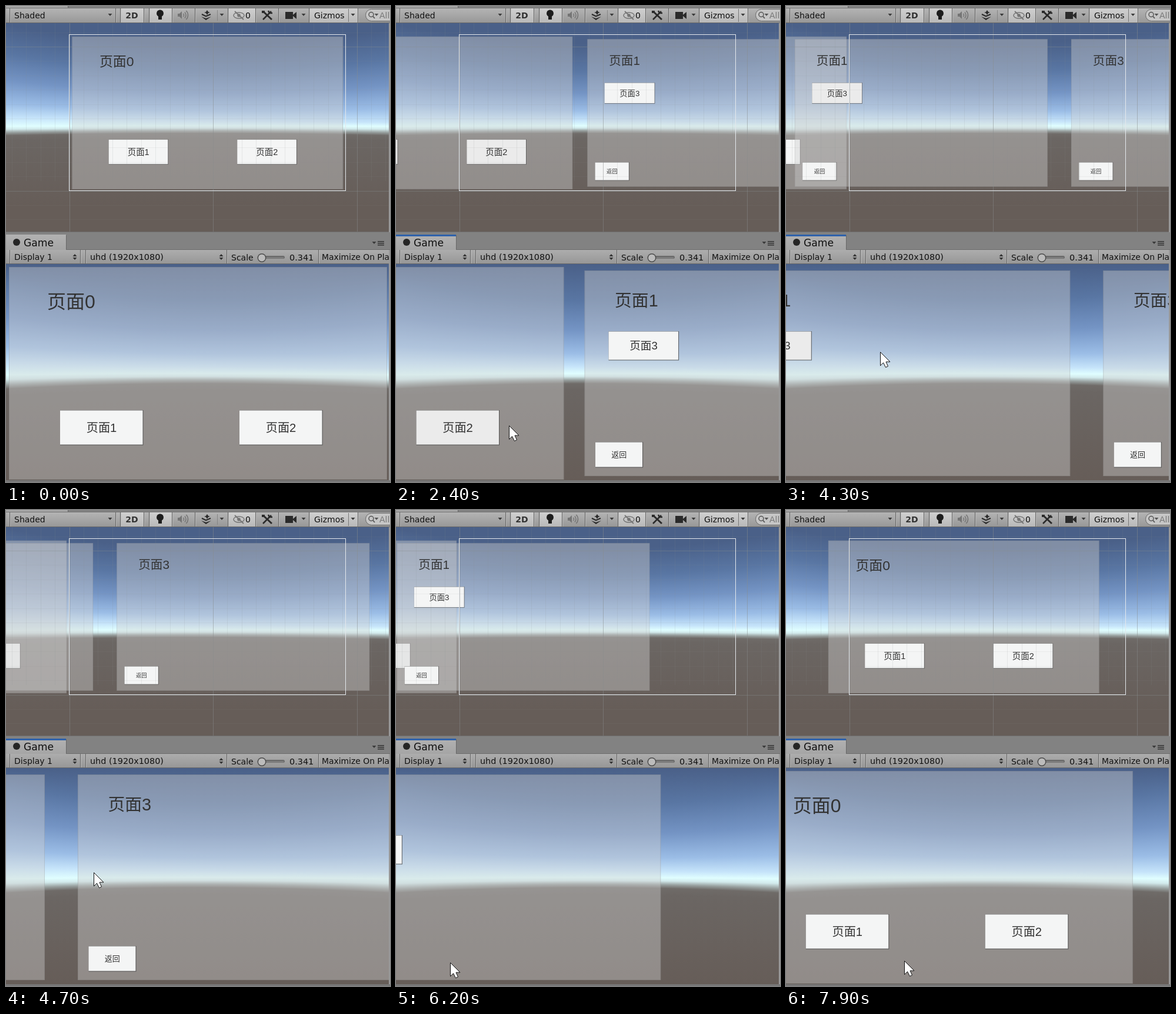
Animation of 653x808 px, one loop 8 s. Source, as an HTML page with a canvas:

```html
<!DOCTYPE html>
<html lang="zh">
<head>
<meta charset="utf-8">
<style>
html, body { margin: 0; width: 100%; height: 100%; overflow: hidden; background: #828282; }
canvas { display: block; }
</style>
</head>
<body>
<canvas id="stage" width="653" height="808"></canvas>
<script>
const W = 653, H = 808, LOOP = 8000, STEP = 100, PAGE = 656;
const stage = document.getElementById('stage').getContext('2d');
const UI = '"DejaVu Sans", sans-serif';
const LABEL = '"Liberation Sans", "Noto Sans CJK SC", "Noto Sans CJK", sans-serif';
const INK = '#323232';

function rect(c, x, y, w, h, color) {
  c.fillStyle = color;
  c.fillRect(x, y, w, h);
}

function text(c, str, x, y, size, color = '#111', family = UI, align = 'left', weight = '') {
  c.font = `${weight} ${size}px ${family}`;
  c.textAlign = align;
  c.fillStyle = color;
  c.fillText(str, x, y);
}

function shape(c, points, color) {
  c.beginPath();
  points.forEach(([x, y]) => c.lineTo(x, y));
  c.closePath();
  c.fillStyle = color;
  c.fill();
}

function stroke(c, points, color, width = 1) {
  c.beginPath();
  points.forEach(([x, y], i) => i ? c.lineTo(x, y) : c.moveTo(x, y));
  c.strokeStyle = color;
  c.lineWidth = width;
  c.stroke();
}

function disc(c, x, y, r, color) {
  c.beginPath();
  c.arc(x, y, r, 0, 7);
  c.fillStyle = color;
  c.fill();
}

function shade(c, x, y, w, h, from, to) {
  const g = c.createLinearGradient(0, y, 0, y + h);
  g.addColorStop(0, from);
  g.addColorStop(1, to);
  rect(c, x, y, w, h, g);
}

// Height above the horizon, colour, and how far the band bends towards the sides
const SKY = [
  [-200, '#4a6088', -28], [-138, '#5976a3', -25], [-88, '#7494c4', -18],
  [-48, '#9bbde6', -8], [-26, '#c6e4fa', -1], [-14, '#e0feff', 2],
  [-9, '#d2eaec', 5], [-3, '#979f9e', 8], [3, '#6f6b68', 9], [14, '#6b6663', 9], [166, '#665d58', 9]
];

function drawSky(c, top, bottom, horizon, scale, bend) {
  for (let x = 0; x < 651; x += 3) {
    const u = x / 325.5 - 1;
    const g = c.createLinearGradient(0, top, 0, bottom);
    for (const [dy, color, curve] of SKY) {
      const side = (curve > 0 ? curve * bend : curve) * u * u + (dy < -20 ? 4 * u : 0);
      const at = (horizon + dy * scale + side - top) / (bottom - top);
      g.addColorStop(Math.min(1, Math.max(0, at)), color);
    }
    rect(c, x, top, Math.min(3, 651 - x), bottom - top, g);
  }
}

const down = (c, x, y, color = '#3a3a3a') => shape(c, [[x - 3.5, y - 2], [x + 3.5, y - 2], [x, y + 2]], color);

function upDown(c, x, y) {
  shape(c, [[x - 3.5, y - 1], [x + 3.5, y - 1], [x, y - 5]], '#333');
  shape(c, [[x - 3.5, y + 1], [x + 3.5, y + 1], [x, y + 5]], '#333');
}

function separators(c, xs, y, h) {
  for (const x of xs) {
    rect(c, x, y, 1, h, '#636363');
    rect(c, x + 1, y, 1, h, '#b9b9b9');
  }
}

function drawTopBar(c) {
  rect(c, 0, 0, W, 4, '#828282');
  rect(c, 0, 0, 105, 3, '#a7a7a7');
  rect(c, 105, 0, 1, 3, '#666');
  rect(c, 0, 3, W, 1, '#707070');
  shade(c, 0, 4, W, 24, '#b4b4b4', '#989898');
  rect(c, 0, 28, W, 1, '#6a6a6a');
  for (const [x, w] of [[195, 40], [244, 38], [378, 46], [516, 82]]) shade(c, x, 4, w, 24, '#d0d0d0', '#b9b9b9');
  separators(c, [6, 186, 194, 234, 243, 282, 321, 377, 424, 463, 515, 598], 4, 24);

  text(c, 'Shaded', 14, 21, 14);
  down(c, 177, 15);
  text(c, '2D', 214, 21, 14, '#333', UI, 'center', 'bold');

  disc(c, 262, 12.5, 6, '#1d1d1d');
  rect(c, 259, 17, 6, 6, '#1d1d1d');

  shape(c, [[292, 13], [295, 13], [299, 9], [299, 22], [295, 18], [292, 18]], '#747474');
  c.strokeStyle = '#747474';
  c.lineWidth = 1.5;
  for (const r of [3.5, 7, 10.5]) {
    c.beginPath();
    c.arc(299, 15.5, r, -.8, .8);
    c.stroke();
  }

  stroke(c, [[333, 14], [340, 17.5], [348, 14]], '#2a2a2a', 2);
  shape(c, [[332, 18], [340, 21], [349, 18], [340, 24]], '#2a2a2a');
  shape(c, [[342, 7], [344, 10], [347, 11], [344, 12], [342, 15], [340, 12], [337, 11], [340, 10]], '#2a2a2a');
  rect(c, 359, 7, 1, 18, '#858585');
  down(c, 367, 15);

  c.beginPath();
  c.ellipse(396, 16, 9, 5, 0, 0, 7);
  c.strokeStyle = '#747474';
  c.lineWidth = 1.5;
  c.stroke();
  disc(c, 396, 16, 2.8, '#747474');
  stroke(c, [[389, 9], [404, 23]], '#747474', 1.8);
  text(c, '0', 407, 21, 14);

  stroke(c, [[437, 9], [452, 23]], '#2a2a2a', 3);
  stroke(c, [[451, 9], [437, 23]], '#2a2a2a', 2.5);
  stroke(c, [[446, 8], [448, 12], [453, 12]], '#2a2a2a', 2.5);
  rect(c, 435, 8, 5, 4, '#2a2a2a');

  rect(c, 475, 10, 13, 12, '#2a2a2a');
  shape(c, [[488, 15], [494, 10], [494, 22], [488, 17]], '#2a2a2a');
  down(c, 506, 15);
  text(c, 'Gizmos', 524, 21, 14);
  rect(c, 582, 5, 1, 22, '#777');
  down(c, 590, 15);

  c.beginPath();
  c.roundRect(611.5, 5.5, 60, 20, 10);
  c.fillStyle = '#c6c6c6';
  c.fill();
  c.strokeStyle = '#686868';
  c.lineWidth = 1;
  c.stroke();
  c.beginPath();
  c.arc(621, 14.5, 4, 0, 7);
  c.strokeStyle = '#555';
  c.lineWidth = 1.5;
  c.stroke();
  stroke(c, [[624, 17.5], [627, 21]], '#555', 1.8);
  down(c, 630, 15, '#555');
  text(c, 'All', 635, 21, 14, '#777');
}

function drawGameBar(c) {
  rect(c, 0, 383, W, 1, '#707070');
  rect(c, 0, 384, W, 29, '#828282');
  shade(c, 0, 388, 102, 26, '#b2b2b2', '#a5a5a5');
  rect(c, 102, 389, 1, 24, '#686868');
  rect(c, 102, 413, W - 102, 1, '#6c6c6c');
  disc(c, 18, 401, 6, '#252525');
  text(c, 'Game', 30, 408, 17.2);
  down(c, 626, 402);
  for (const y of [399, 402, 405]) rect(c, 632, y, 11, 1.5, '#333');

  shade(c, 0, 414, W, 23, '#adadad', '#979797');
  rect(c, 0, 437, W, 1, '#6a6a6a');
  separators(c, [6, 126, 135, 375, 531], 414, 23);
  text(c, 'Display 1', 14, 431, 14);
  upDown(c, 117, 426);
  text(c, 'uhd (1920x1080)', 143, 431, 14.4);
  upDown(c, 366, 426);
  text(c, 'Scale', 383, 432, 14);
  c.beginPath();
  c.roundRect(438, 424, 36, 5, 2.5);
  c.fillStyle = '#6d6d6d';
  c.fill();
  rect(c, 440, 427, 32, 1, '#909090');
  disc(c, 435, 427.5, 7.5, '#4c4c4c');
  disc(c, 435, 427.5, 6, '#bcbcbc');
  text(c, '0.341', 482, 432, 14.4);
  text(c, 'Maximize On Pla', 537, 431, 13.9);
}

const backdrop = Object.assign(document.createElement('canvas'), { width: W, height: H });

function drawBackdrop() {
  const c = backdrop.getContext('2d');
  rect(c, 0, 0, W, H, '#828282');
  drawSky(c, 29, 383, 214, .75, .4);
  drawSky(c, 438, 805, 638, 1, 1);
  drawTopBar(c);
  drawGameBar(c);
  rect(c, 651, 29, 2, 355, '#9a9a9a');
  rect(c, 651, 414, 2, 394, '#9a9a9a');
  rect(c, 0, 805, W, 3, '#777');
}

function drawGrid(c) {
  for (let i = -4; i <= 22; i++) {
    const major = i % 10 === 0;
    rect(c, Math.round(107.5 + i * 24.45), 29, 1, major ? 354 : 268, `rgba(135,140,140,${major ? .5 : .14})`);
  }
  for (let i = -2; i <= 11; i++) {
    const major = i % 10 === 0;
    rect(c, 0, Math.round(313.5 - i * 24.45), 651, 1, `rgba(135,140,140,${major ? .42 : .1})`);
  }
  c.strokeStyle = '#e4e8ec';
  c.lineWidth = 1;
  c.strokeRect(107.5, 48.5, 470, 265);
}

// Button: x, y, width, height, label, text size, times of [press, release, deselect]
const back = times => [45.5, 740, 80.5, 43, '返回', 13, times];
const PAGES = [
  { box: [5, 443, 643, 361], title: ['页面0', 70, 512.5, 32], buttons: [
    [92, 686, 141, 59, '页面1', 20.2, [1400, 1600, 4000]],
    [397, 686, 141, 59, '页面2', 20.2]] },
  { box: [27, 449, 600, 349], title: ['页面1', 78.5, 510, 28.8], buttons: [
    [68, 552, 119, 49, '页面3', 18.6, [4000, 4100, 5400]],
    back([6600, 6700, 6700])] },
  { box: [27, 449, 600, 349], title: ['页面3', 78.5, 510, 28.8], buttons: [back([5400, 5600, 5600])] }
];

const MOVES = [
  { start: 1873, time: 1000, lead: 15 },
  { start: 3969, time: 1000, lead: 16 },
  { start: 5567, time: 1000, lead: 0 },
  { start: 7158, time: 940, lead: 3 }
];

function progress(t, i, scene) {
  const { start, time, lead } = MOVES[i];
  const u = Math.min(1, Math.max(0, (t - start + (scene ? lead : 0)) / time));
  const p = u < .5 ? 2 * u * u : 1 - 2 * (1 - u) ** 2;
  return p < .006 ? 0 : p;
}

// Page offsets in screen pixels; null while a page is hidden
function offsets(t, scene) {
  const [a, b, c, d] = MOVES.map((_, i) => progress(t, i, scene));
  return [
    (d - a) * PAGE,
    t >= 1600 && t < 6700 ? (1 - a - b + c) * PAGE : null,
    t >= 4100 && t < 5600 ? (1 - b) * PAGE : null
  ];
}

const CURSOR = [
  [300, 584, 177], [600, 436, 430], [700, 436, 430], [1300, 190, 708], [1400, 192, 712],
  [2800, 192, 712], [3500, 160, 587], [4500, 160, 587], [5300, 92, 768],
  [6800, 92, 768], [7200, 202, 760], [7400, 202, 760], [7900, 201, 765]
];

function cursorAt(t) {
  if (t < CURSOR[0][0]) return null;
  const i = CURSOR.findIndex(k => k[0] > t);
  if (i < 0) return CURSOR.at(-1).slice(1);
  const [t0, x0, y0] = CURSOR[i - 1], [t1, x1, y1] = CURSOR[i];
  const u = (t - t0) / (t1 - t0), e = u * u * (3 - 2 * u);
  return [x0 + (x1 - x0) * e, y0 + (y1 - y0) * e];
}

function hovered(t, page, [x, y, w, h]) {
  const p = cursorAt(t), dx = offsets(t, false)[page];
  if (!p || dx === null) return false;
  const px = p[0] - dx - x, py = p[1] - y;
  return px >= 0 && px <= w && py >= 0 && py <= h;
}

function buttonColor(t, page, button) {
  const [press, release, deselect] = button[6] || [LOOP, LOOP, LOOP];
  if (t >= press && t < release) return '#d7d7d7';
  const active = t >= release && t < deselect;
  return active || hovered(t, page, button) || hovered(t - STEP, page, button) ? '#ebebeb' : '#f4f5f5';
}

function drawPage(c, t, index, dx) {
  const { box: [x, y, w, h], title: [name, tx, ty, size], buttons } = PAGES[index];
  c.save();
  c.translate(dx, 0);
  rect(c, x, y, w, h, 'rgba(207,207,207,.41)');
  c.strokeStyle = 'rgba(90,90,90,.18)';
  c.lineWidth = 1;
  c.strokeRect(x + .5, y + .5, w - 1, h - 1);
  text(c, name, tx, ty, size, INK, LABEL);
  for (const b of buttons) {
    const [bx, by, bw, bh, label, fs] = b;
    rect(c, bx, by, bw + .6, bh + .6, 'rgba(70,70,70,.75)');
    rect(c, bx, by + .5, bw - .5, bh - 1, buttonColor(t, index, b));
    text(c, label, bx + bw / 2, by + bh / 2 + fs * .37, fs, INK, LABEL, 'center');
  }
  c.restore();
}

function drawView(c, t, top, bottom, scene) {
  c.save();
  c.beginPath();
  c.rect(0, top, 651, bottom - top);
  c.clip();
  c.save();
  if (scene) {
    c.translate(108, 49);
    c.scale(.7166, .718);
    c.translate(1, -439);
  }
  offsets(t, scene).forEach((dx, i) => dx !== null && drawPage(c, t, i, dx));
  c.restore();
  if (scene) drawGrid(c);
  c.restore();
}

function drawCursor(c, [x, y]) {
  c.save();
  c.translate(Math.round(x) + .5, Math.round(y) + .5);
  const arrow = [[0, 0], [0, 23], [5, 18], [9, 26], [13, 24], [9.5, 16.5], [16.5, 16.5]];
  shape(c, arrow, '#fff');
  c.strokeStyle = '#111';
  c.lineWidth = 1;
  c.stroke();
  c.restore();
}

function draw(t) {
  stage.drawImage(backdrop, 0, 0);
  if (t >= 1400) rect(stage, 0, 388, 102, 3, '#2f62ab');
  drawView(stage, t, 29, 383, true);
  drawView(stage, t, 438, 805, false);
  const p = cursorAt(t);
  if (p) drawCursor(stage, p);
}

function tick() {
  const t = performance.now() % LOOP;
  draw(Math.floor(t / STEP) * STEP);
  requestAnimationFrame(tick);
}

drawBackdrop();
tick();
</script>
</body>
</html>
```
